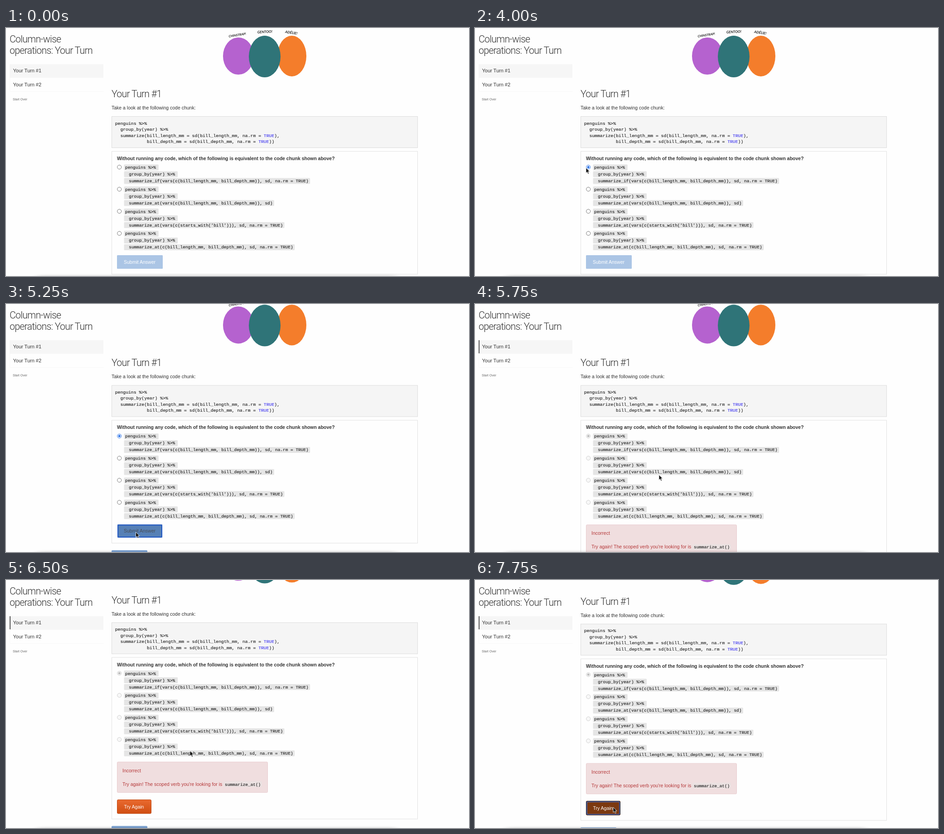
Animation, 1022 px wide and 548 px high, one loop 8000 ms. Source, as an HTML page:

```html
<!DOCTYPE html>
<html lang="en">
<head>
<meta charset="utf-8">
<title>Column-wise operations quiz</title>
<style>
html, body { margin: 0; width: 100%; height: 100%; overflow: hidden; background: #fefefe; }
svg { display: block; width: 1022px; height: 548px; }
text { font: 10.5px "Liberation Sans", Arial, sans-serif; fill: #333; }
.thin { font: 300 21.3px Roboto, sans-serif; letter-spacing: -.75px; }
.nav { font-size: 11px; }
.small { font-size: 7px; fill: #666; }
.bold { font-weight: bold; }
.block, .code { font-family: "Liberation Mono", "Courier New", monospace; fill: #222; stroke: #222; stroke-width: .15px; }
.block { font-size: 9.78px; }
.code { font-size: 9.45px; }
.true { fill: #4038f0; stroke: #4038f0; }
.label { font: italic 700 7.8px Lato, sans-serif; fill: #222; }
.error { fill: #b5393a; }
.white { fill: #fff; }
.line { fill: #fefefe; stroke: #e2e2e2; }
</style>
</head>
<body>
<svg viewBox="0 0 1022 548">
  <defs>
    <linearGradient id="orange" x2="0" y2="1">
      <stop stop-color="#e9692f"/><stop offset="1" stop-color="#d04e12"/>
    </linearGradient>
    <filter id="blur" x="-10%" y="-200%" width="120%" height="500%"><feGaussianBlur stdDeviation="9 3"/></filter>
  </defs>

  <g id="sidebar">
    <text class="thin" x="8" y="32">Column-wise</text>
    <text class="thin" x="8" y="57">operations: Your Turn</text>
    <path d="M8 80h207v30h-207z" fill="#f6f6f6"/>
    <path d="M8.5 110v30.500h206.500" fill="none" stroke="#f2f2f2" stroke-dasharray="1 1"/>
    <path id="active" d="M9 80v29" stroke="#555" stroke-width="2"/>
    <text class="nav" x="15.500" y="98">Your Turn #1</text>
    <text class="nav" x="15.500" y="129">Your Turn #2</text>
    <text class="small" x="15" y="159.500">Start Over</text>
  </g>

  <g id="page">
    <ellipse cx="513" cy="62" rx="34" ry="41" fill="#b562cf"/>
    <ellipse cx="631" cy="62" rx="32" ry="45" fill="#f47d2b"/>
    <ellipse cx="571" cy="63" rx="35" ry="46" fill="#2f7478"/>
    <text class="label" transform="translate(492 21) rotate(-9)" style="font-size:7px">CHINSTRAP!</text>
    <text class="label" transform="translate(555 12) rotate(-3)">GENTOO!</text>
    <text class="label" transform="translate(616 11) rotate(8)">ADÉLIE!</text>

    <text class="thin" x="233" y="153">Your Turn #1</text>
    <text x="233" y="180">Take a look at the following code chunk:</text>
    <rect class="line" x="233.500" y="195.500" width="675" height="69" style="fill:#f5f5f5;stroke:#dcdcdc"/>
    <text class="block" x="240.700" y="213.500">penguins %&gt;%</text>
    <text class="block" x="252.400" y="227">group_by(year) %&gt;%</text>
    <text class="block" x="252.400" y="240.500">summarize(bill_length_mm = sd(bill_length_mm, na.rm = <tspan class="true">TRUE</tspan>),</text>
    <text class="block" x="311" y="254">bill_depth_mm = sd(bill_depth_mm, na.rm = <tspan class="true">TRUE</tspan>))</text>

    <rect id="card" class="line" x="233.500" y="272.500" width="675"/>
    <text class="bold" x="245" y="292">Without running any code, which of the following is equivalent to the code chunk shown above?</text>
    <g id="answers"></g>

    <g id="submit">
      <rect id="submitBox" x="245" y="502" width="101" height="30" rx="1.500"/>
      <g id="focus" fill="none">
        <rect x="245.500" y="502.500" width="100" height="29" stroke="#fefefe"/>
        <rect x="247" y="504" width="97" height="26.500" rx="1" stroke="#1f57c6" stroke-width="2"/>
      </g>
      <text id="submitText" x="260" y="521">Submit Answer</text>
    </g>

    <g id="feedback">
      <rect x="245.500" y="503.500" width="332" height="67.500" rx="2" fill="#f0dedf" stroke="#e8cccf"/>
      <text class="error" x="257" y="526">Incorrect</text>
      <text class="error" x="257" y="556">Try again! The scoped verb you're looking for is</text>
      <rect x="480" y="546" width="85" height="13" rx="2" fill="#ebe1e1"/>
      <text class="code" x="483" y="556">summarize_at()</text>
      <rect x="245.500" y="587" width="75" height="30.500" rx="2" fill="url(#orange)" stroke="#bf4a14"/>
      <rect id="hover" x="245.500" y="587" width="75" height="30.500" rx="2" fill="#b9470f"/>
      <g id="pressed">
        <rect x="245.500" y="587" width="75" height="30.500" rx="2" fill="#7c3910" stroke="#1d1a1a"/>
        <rect x="247" y="588.500" width="72" height="27.500" rx="1" fill="none" stroke="#3a68c8" stroke-width="1.500"/>
      </g>
      <text class="white" x="260.500" y="606">Try Again</text>
    </g>
    <rect id="next" x="233" width="79" height="30" rx="2" fill="#7fa6d6"/>
  </g>

  <path d="M70 549h790v8h-790z" fill="#000" opacity=".3" filter="url(#blur)"/>
  <path id="cursor" d="M0 0v11.500l2.600-2.400 1.900 4.300 2-.9-1.900-4.200h3.600z" fill="#111" stroke="#fff" stroke-width=".8"/>
</svg>
<script>
const $ = id => document.getElementById(id);
const LOOP = 8000;

const calls = [
  "summarize_if(vars(c(bill_length_mm, bill_depth_mm)), sd, na.rm = TRUE)",
  "summarize_at(vars(c(bill_length_mm, bill_depth_mm)), sd)",
  "summarize_at(vars(c(starts_with('bill'))), sd, na.rm = TRUE)",
  "summarize_at(c(bill_length_mm, bill_depth_mm), sd, na.rm = TRUE)"
];

function codeLine(text, x, y, pad) {
  const right = x + text.length * 5.67 + pad;
  return `<rect x="260.500" y="${y - 9.5}" width="${right - 260.5}" height="13" rx="1.500" fill="#e5e5e5"/>` +
    `<text class="code" x="${x}" y="${y}">${text.replace(/>/g, "&gt;")}</text>`;
}

$("answers").innerHTML = calls.map((call, i) => {
  const y = 311 + i * 48.8;
  return `<circle class="ring" cx="250.200" cy="${y - 3.6}" r="4.500"/>` +
    codeLine("penguins %>%", 263, y, 5.7) +
    codeLine("group_by(year) %>%", 271.3, y + 15, 5.7) +
    codeLine(call, 271.3, y + 30, 3);
}).join("") + '<circle id="dot" cx="250.200" cy="307.400" r="2.500"/>';
const rings = document.querySelectorAll(".ring");

// Each entry holds from its time until the next one.
const scrolls = [[0, 0], [4500, 14.3], [4750, 15.6], [6000, 54.8], [6250, 84],
  [6500, 101.4], [6750, 100], [7000, 97.6], [7500, 98.3]];
const pointer = [[0, -50, -50], [1000, 398, 95], [1250, 382, 121], [1500, 357, 168],
  [1750, 294, 249], [2000, 258, 290], [2250, 244, 309], [3750, 245, 309], [4750, 266, 384],
  [5000, 286.5, 504], [5500, 300, 497], [5750, 406, 377.5], [7250, 339, 469.5], [7500, 305, 502]];
const submitFills = [[0, "#abc5e5"], [4250, "#7fa6d6"], [5000, "#5f8cc6"], [5250, "#5680b6"]];

const at = (steps, t) => steps.filter(s => s[0] <= t).pop().slice(1);
const show = (id, on) => $(id).style.display = on ? "" : "none";
const set = (el, attrs) => { for (const k in attrs) el.setAttribute(k, attrs[k]); };

function draw(t) {
  const [scroll] = at(scrolls, t), [x, y] = at(pointer, t), [fill] = at(submitFills, t);
  const answered = t >= 5500, checked = t >= 4000, submitted = t >= 5250;

  set($("page"), { transform: `translate(0 ${-scroll})` });
  set($("cursor"), { transform: `translate(${x} ${y})` });
  set($("submitBox"), { fill });
  $("submitText").style.fill = submitted ? "#484c54" : "#fff";
  show("focus", submitted);

  rings.forEach((ring, i) => {
    const chosen = i === 0 && checked;
    const held = i === 0 && t >= 3750 && !checked;
    set(ring, {
      stroke: answered ? "#cfcfcf" : chosen ? "#2d74e8" : "#777",
      fill: held ? "#ddd" : answered ? "#f8f8f8" : "#fff"
    });
  });
  show("dot", checked);
  set($("dot"), { fill: answered ? "#bdbdbd" : "#2d74e8" });

  show("active", answered);
  show("submit", !answered);
  show("feedback", answered);
  show("hover", t >= 7500);
  show("pressed", t >= 7750);
  set($("card"), { height: answered ? 357 : 271.5 });
  set($("next"), { y: answered ? 645 : 559.5 });
}

const start = performance.now();
function tick() {
  draw((performance.now() - start) % LOOP);
  requestAnimationFrame(tick);
}
tick();
</script>
</body>
</html>
```
